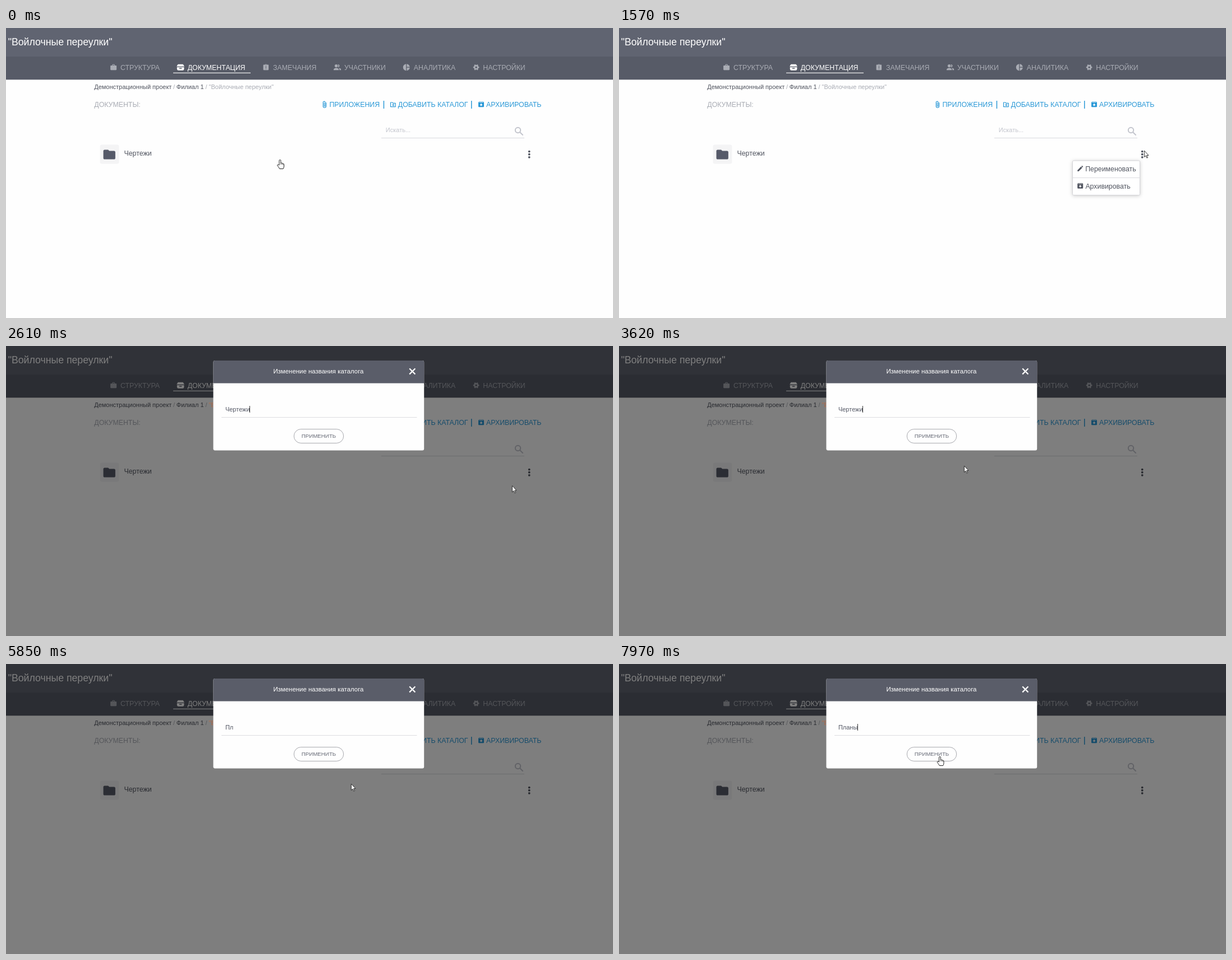
An HTML page for the animation above (8 s loop, 1082 px wide and 518 px high).

```html
<!DOCTYPE html>
<html lang="ru">
<head>
<meta charset="utf-8">
<style>
html, body { margin: 0; width: 100%; height: 100%; overflow: hidden; background: #fefefe; }
svg { display: block; font: 12.35px "Liberation Sans", Arial, sans-serif; }
.gray { fill: #a9acb4; }
.dark { fill: #50545f; }
.blue { fill: #2b99d7; }
.small { font-size: 11px; }
.line { fill: none; stroke-linecap: round; stroke-linejoin: round; }
</style>
</head>
<body>
<svg width="1082" height="518" viewBox="0 0 1082 518">
  <defs>
    <path id="archive" fill-rule="evenodd" d="M1.2 0H8.8L10 1.6V8.5Q10 9.8 8.7 9.8H1.3Q0 9.8 0 8.5V1.6ZM1.6 .8 1.2 1.5H8.8L8.4 .8ZM4.1 3.6V5.3H2.2L5 8 7.8 5.3H5.9V3.6Z"/>
  </defs>

  <rect width="1082" height="51.5" fill="#606471"/>
  <rect y="51" width="1082" height="41.3" fill="#575b67"/>
  <text x="3.7" y="31" font-size="17.7" fill="#fff">"Войлочные переулки"</text>

  <g class="gray">
    <path transform="translate(185 63.6) scale(.55)" d="M20 6h-4V4c0-1.1-.9-2-2-2h-4c-1.1 0-2 .9-2 2v2H4c-1.1 0-2 .9-2 2v11c0 1.1.9 2 2 2h16c1.1 0 2-.9 2-2V8c0-1.1-.9-2-2-2zm-6 0h-4V4h4v2z"/>
    <text x="204" y="75">СТРУКТУРА</text>

    <g fill="#fff">
      <path d="M306.5 64.8H315.500L318 68.8H304.200Z"/>
      <path fill-rule="evenodd" d="M304.800 70H317.400V73.500Q317 75.800 314.800 75.800H307.400Q305.200 75.800 304.800 73.500ZM308.800 71.200V72.700H313.400V71.200Z"/>
      <text x="323.7" y="75">ДОКУМЕНТАЦИЯ</text>
      <rect x="298" y="79.700" width="138" height="1.100"/>
    </g>

    <path transform="translate(457 64) scale(.53)" d="M19 3h-4.200C14.400 1.800 13.300 1 12 1s-2.400.8-2.800 2H5c-1.100 0-2 .9-2 2v14c0 1.100.9 2 2 2h14c1.100 0 2-.9 2-2V5c0-1.100-.9-2-2-2zm-6 15h-2v-2h2v2zm0-4h-2V8h2v6zm-1-9c-.6 0-1-.4-1-1s.4-1 1-1 1 .4 1 1-.4 1-1 1z"/>
    <text x="476" y="75">ЗАМЕЧАНИЯ</text>

    <circle cx="588.600" cy="67.600" r="2.700"/>
    <path d="M584 75.300V74Q584.300 72 588.600 71.200 593 72 593.200 74V75.300ZM591.400 65A2.600 2.600 0 1 1 591.400 70.100 4 4 0 0 0 591.400 65ZM592.800 71.300Q597 72 597.200 74V75.300H594.400V74Q594.300 72.300 592.800 71.300Z"/>
    <text x="603" y="75">УЧАСТНИКИ</text>

    <path transform="translate(706.600 63) scale(.6)" d="M11 2v20c-5.100-.5-9-4.800-9-10s3.900-9.500 9-10zm2 0v9h9c-.5-4.700-4.300-8.500-9-9zm0 11v9c4.700-.5 8.500-4.300 9-9z"/>
    <text x="726.800" y="75">АНАЛИТИКА</text>

    <g fill="none" stroke="#a9acb4">
      <circle cx="838.100" cy="70.200" r="2.900" stroke-width="2.400"/>
      <circle cx="838.100" cy="70.200" r="4.500" stroke-width="1.700" pathLength="12" stroke-dasharray="1 1" stroke-dashoffset=".5"/>
    </g>
    <text x="850.300" y="75">НАСТРОЙКИ</text>
  </g>

  <g class="small">
    <text class="dark" x="157.200" y="108.600">Демонстрационный проект</text>
    <text class="gray" x="298" y="108.600">/</text>
    <text class="dark" x="303.800" y="108.600">Филиал 1</text>
    <text class="gray" x="355.500" y="108.600">/</text>
    <text class="gray" x="361.600" y="108.600">"Войлочные переулки"</text>
  </g>

  <text class="gray" x="157.300" y="141.300">ДОКУМЕНТЫ:</text>
  <g class="blue">
    <path class="line" stroke="#2b99d7" stroke-width="1.100" d="M570.600 133.500V139.500A2.600 2.600 0 0 1 565.200 139.500V133A1.800 1.800 0 0 1 569 133V138.700A.9 .9 0 0 1 567 138.700V133.800"/>
    <text x="576.400" y="141.300">ПРИЛОЖЕНИЯ</text>
    <rect x="672.700" y="130" width="1.500" height="14"/>
    <path class="line" stroke="#2b99d7" stroke-width="1.200" d="M685.500 133H688.700L690 134.300H694.200V140.600H685.500ZM688.600 137.500H692M690.300 135.900V139.100"/>
    <text x="698.800" y="141.300">ДОБАВИТЬ КАТАЛОГ</text>
    <rect x="829" y="130" width="1.500" height="14"/>
    <use href="#archive" x="842" y="131.500"/>
    <text x="856" y="141.300">АРХИВИРОВАТЬ</text>
  </g>

  <text class="small" x="676.800" y="186" fill="#c3c5cd">Искать...</text>
  <rect x="669" y="196" width="255" height="1" fill="#d8d9de"/>
  <path class="line" stroke="#c3c5cd" stroke-width="2" d="M917.200 182.500A4.700 4.700 0 1 1 907.800 182.500 4.700 4.700 0 0 1 917.200 182.500M916.200 186.200 921 191"/>

  <rect x="167.500" y="208.500" width="34" height="34" rx="3" fill="#f4f4f5"/>
  <path fill="#565a69" transform="translate(171.400 213.200) scale(1.067)" d="M10 4H4c-1.100 0-2 .9-2 2v12c0 1.100.9 2 2 2h16c1.100 0 2-.9 2-2V8c0-1.100-.9-2-2-2h-8l-2-2z"/>
  <text class="dark" x="210.500" y="227.600">Чертежи</text>
  <g class="dark">
    <circle cx="932.700" cy="220.600" r="1.900"/>
    <circle cx="932.700" cy="225.700" r="1.900"/>
    <circle cx="932.700" cy="230.800" r="1.900"/>
  </g>

  <g id="menu" class="dark">
    <rect x="808.500" y="237" width="120" height="61.500" rx="2" fill="#fff" stroke="#d4d4d8" style="filter:drop-shadow(0 1px 3px #0003)"/>
    <rect id="hover" x="809" y="237" width="119.500" height="30.500" fill="#e1e1e6"/>
    <rect x="809" y="267" width="119.500" height="1" fill="#dcdce0"/>
    <path d="M817.300 256V253.900L823.600 247.600 825.700 249.700 819.400 256ZM824.200 247 825 246.200Q825.500 245.900 826 246.300L827 247.300Q827.300 247.800 827 248.300L826.300 249.100Z"/>
    <text x="831.200" y="256.300">Переименовать</text>
    <use href="#archive" x="817.200" y="277"/>
    <text x="831.400" y="287">Архивировать</text>
  </g>

  <g id="modal">
    <rect width="1082" height="518" opacity=".5"/>
    <text class="small" x="361.600" y="108.600" fill="#bd7350">"В</text>
    <rect x="369.500" y="26" width="375.700" height="160.500" rx="3" fill="#fefefe"/>
    <path fill="#5a5d69" d="M369.500 66.500V29A3 3 0 0 1 372.500 26H742.200A3 3 0 0 1 745.200 29V66.500Z"/>
    <text x="476.400" y="49.200" font-size="11.450" fill="#fff">Изменение названия каталога</text>
    <path stroke="#fff" stroke-width="2.200" d="M719.200 40.200 729.400 50.400M729.400 40.200 719.200 50.400"/>
    <rect x="384" y="127" width="348.500" height="1" fill="#dddde0"/>
    <rect id="mark" x="391" y="106" width="44" height="16" fill="#3390ff"/>
    <text id="field" class="small" x="390.900" y="117"></text>
    <rect id="caret" y="107" width="1" height="12" fill="#333"/>
    <rect x="513.300" y="148.500" width="88.400" height="25" rx="12.500" fill="#fefefe" stroke="#a8a9ae"/>
    <text x="526.700" y="164.200" font-size="9.750" fill="#666a76">ПРИМЕНИТЬ</text>
  </g>

  <g id="cursor" fill="#fff" stroke="#222" stroke-linejoin="round">
    <path id="arrow" stroke-width=".9" d="M.4 .6V12L3 9.600 4.900 13.700 6.500 13 4.700 9H8Z"/>
    <g id="hand">
      <path d="M-1.500 10V1.900A1.400 1.400 0 0 1 1.400 1.900V6.400A1.300 1.300 0 0 1 3.700 6.900 1.200 1.200 0 0 1 5.600 7.500 1.100 1.100 0 0 1 7 8.500V12Q7 14 5.600 16.500H-.8Q-2 13.800-4.500 11A1.200 1.200 0 0 1-2.700 9.400Z"/>
      <path stroke-width=".7" d="M1.400 6.400V9M3.700 6.900V9.300M5.600 7.500V9.600"/>
    </g>
  </g>
</svg>
<script>
const $ = id => document.getElementById(id);
const show = (id, on) => $(id).style.display = on ? '' : 'none';
const clamp = v => Math.min(1, Math.max(0, v));
const last = (list, t) => list.filter(item => item[0] <= t).pop();

// start, end, destination of the pointer tip
const moves = [
  [40, 610, 948, 251.5],
  [790, 1090, 936, 218.5],
  [1950, 2260, 902, 249],
  [2720, 3110, 615, 213.5],
  [7660, 7970, 572, 165]
];
// time, field text, caret visible
const typing = [
  [0, 'Чертежи', 1], [3110, 'Чертежи', 0], [3620, 'Чертежи', 1],
  [4160, 'Чертежи', 0], [4670, 'Чертежи', 1], [4920, 'Чертежи', 0],
  [5350, 'П', 1], [5500, 'Пл', 1], [5850, 'Пл', 0],
  [6110, 'Пла', 1], [6290, 'План', 1], [6460, 'Планы', 1],
  [6970, 'Планы', 0], [7510, 'Планы', 1]
];

function pointer(t) {
  let x = 488.5, y = 235;
  for (const [start, end, toX, toY] of moves) {
    const p = clamp((t - start) / (end - start)), e = p * p * (3 - 2 * p);
    x += (toX - x) * e;
    y += (toY - y) * e;
  }
  if (t < 610) y -= 6 * Math.sin(Math.PI * clamp((x - 488.5) / 459.5));
  return [x, y];
}

function draw(t) {
  const open = t >= 2610, [x, y] = pointer(t);
  $('cursor').setAttribute('transform', `translate(${x} ${y})`);
  const hand = open ? x < 602 && y < 174 : t < 1450 && x < 943 && y < 245;
  show('hand', hand);
  show('arrow', !hand);

  show('menu', t >= 1420 && !open);
  $('menu').style.opacity = clamp((t - 1390) / 150);
  show('hover', x < 929 && y > 237);

  show('modal', open);
  if (!open) return;
  const [, text, caret] = last(typing, t), marked = t >= 4920 && t < 5350;
  const field = $('field');
  field.textContent = text;
  field.setAttribute('fill', marked ? '#fff' : '#555966');
  show('mark', marked);
  show('caret', caret);
  $('caret').setAttribute('x', Math.round(390.4 + field.getComputedTextLength()));
}

const begin = performance.now();
function tick() {
  draw((performance.now() - begin) % 8000);
  requestAnimationFrame(tick);
}
tick();
</script>
</body>
</html>
```
